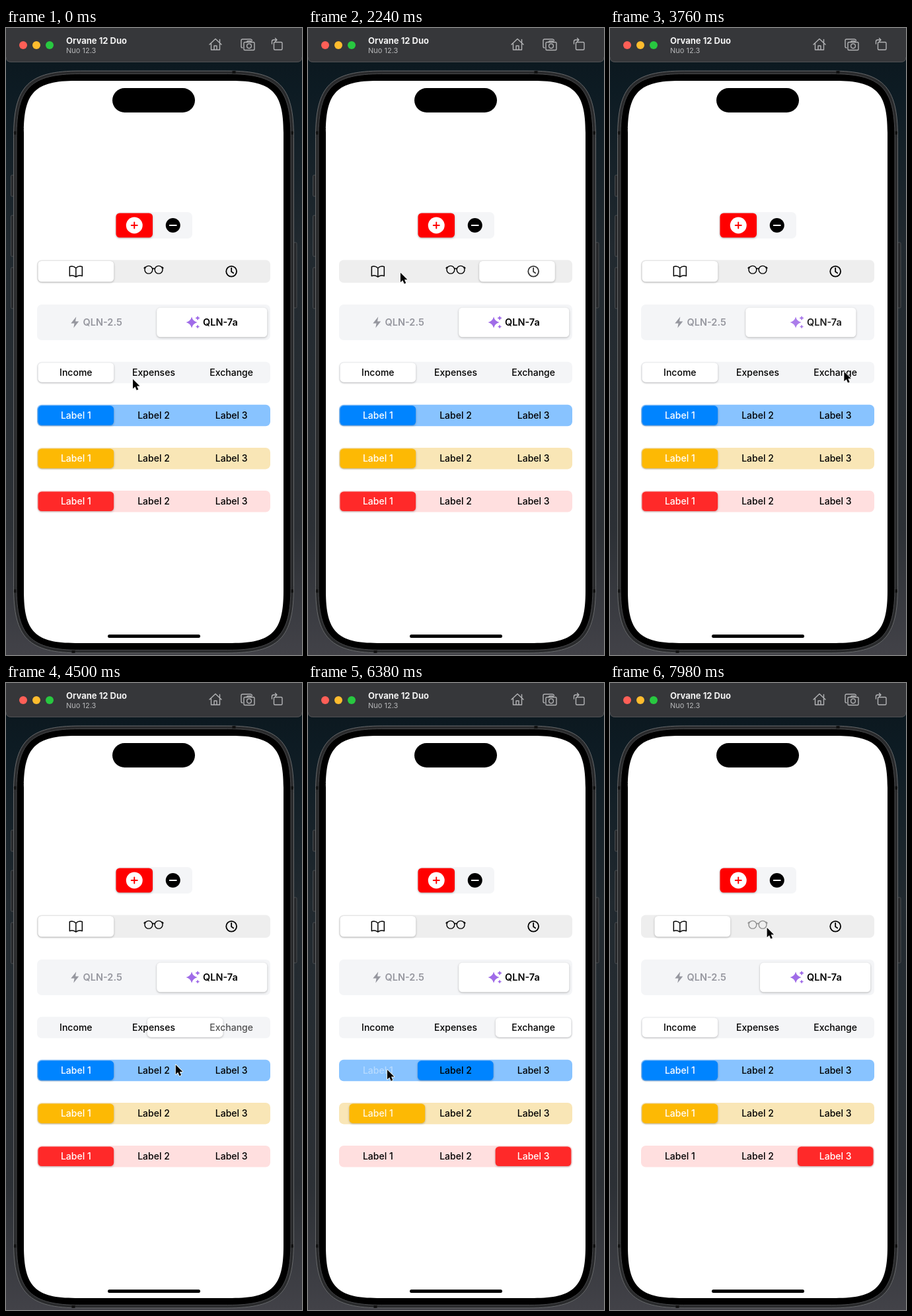
Write an HTML page that moves like this. It is 448x950 px and loops after 8000 ms.

```html
<!DOCTYPE html>
<html lang="en">
<head>
<meta charset="utf-8">
<title>Segmented controls</title>
<style>
html, body { margin: 0; height: 100%; overflow: hidden; background: #10181e; }
svg { display: block; width: 100vw; height: 100vh; }
text { font: 500 14px Inter, "Open Sans", sans-serif; fill: currentColor; }
.line { fill: none; stroke: currentColor; stroke-linecap: round; stroke-linejoin: round; }
.thumb { fill: var(--fill); filter: drop-shadow(0 1px 1.5px #0004); }
.item { color: #000; }
.tint.on, .round.on { color: #fff; }
.sign { stroke: #fff; stroke-width: 2; stroke-linecap: round; }
.round.on .sign { stroke: var(--fill); }
.model { color: #96979f; }
.model text { font-weight: 600; font-size: 14.5px; }
.model.on text { color: #000; }
.bolt.on path { color: #ffb21a; }
.spark.on path { color: #a06ce8; }
</style>
</head>
<body>
<svg viewBox="0 0 448 950" preserveAspectRatio="none">
  <defs>
    <linearGradient id="wall" x2="0" y2="1">
      <stop stop-color="#0b161c"/><stop offset=".1" stop-color="#0d1b23"/>
      <stop offset=".35" stop-color="#21292f"/><stop offset=".8" stop-color="#2c3035"/>
      <stop offset="1" stop-color="#424248"/>
    </linearGradient>
  </defs>
  <rect width="448" height="950" fill="url(#wall)"/>

  <path d="M0 0H448V44Q448 52 440 52H8Q0 52 0 44Z" fill="#36373a"/>
  <path d="M0 44Q0 51.500 8 51.500H440Q448 51.500 448 44" fill="none" stroke="#505154"/>
  <circle cx="26" cy="26" r="6" fill="#ff5f57"/>
  <circle cx="46" cy="26" r="6" fill="#febc2e"/>
  <circle cx="66" cy="26" r="6" fill="#28c840"/>
  <text x="91" y="24" style="font-size:13px;font-weight:700" color="#f2f2f2">Orvane 12 Duo</text>
  <text x="91" y="38" style="font-size:11px;font-weight:400" color="#b5b6b8">Nuo 12.3</text>
  <g class="line" color="#b2b3b5" stroke-width="1.4">
    <path d="M308 25L317 16.500L326 25M310.500 23.500V33H323.500V23.500M323.500 22V17.500M315 33V27H319V33"/>
    <path d="M358 30Q356 30 356 28V19Q356 17 358 17H370Q372 17 372.500 19M364 21.500L365.500 19.700H370.500L372 21.500"/>
    <rect x="360" y="21.500" width="16" height="12" rx="1.500"/>
    <circle cx="368" cy="27.300" r="3.400"/>
    <rect x="405.500" y="21.500" width="12.500" height="11.500" rx="1.500"/>
    <path d="M402.500 24V20.500Q402.500 18 405 18H410M407.500 15.500L410 18L407.500 20.500"/>
  </g>

  <g id="phone"></g>
  <g id="controls"></g>
  <path id="cursor" d="M0 0V14.500L3.400 11.400L5.700 16.800L8.300 15.700L6 10.500H10.500Z"
    stroke="#fff" stroke-width="1.600" stroke-linejoin="round" paint-order="stroke"/>
</svg>
<script>
const LOOP = 8000;
const OMEGA = 2 * Math.PI / 500; // critically damped spring, 500 ms response
const phone = document.getElementById('phone');
const controls = document.getElementById('controls');
const cursor = document.getElementById('cursor');

const rect = (x, y, w, h, r, rest) =>
  `<rect x="${x}" y="${y}" width="${w}" height="${h}" rx="${r}" ${rest}/>`;

// Rectangle with continuous-curvature corners, centred on the phone
function squircle(w, h, r, rest) {
  const e = r * 1.4, k = r * .31, a = w - 2 * e, b = h - 2 * e;
  return `<path transform="translate(${223.5 - w / 2} ${506 - h / 2})" ${rest} d="M0 ${e}` +
    `c0 ${k - e} ${k} ${-e} ${e} ${-e}h${a}c${e - k} 0 ${e} ${k} ${e} ${e}` +
    `v${b}c0 ${e - k} ${-k} ${e} ${-e} ${e}h${-a}c${k - e} 0 ${-e} ${-k} ${-e} ${-e}z"/>`;
}

const button = (x, y, h) => rect(x, y, 6, h, 1.5, 'fill="#25272a" stroke="#55575a" stroke-width=".8"');
phone.innerHTML =
  button(7.5, 223, 32) + button(7.5, 284, 62) + button(7.5, 363, 62) + button(434, 325, 99) +
  squircle(424, 882, 72, 'fill="#292a2c" stroke="#67696b"') +
  '<path d="M345 65V70M102 942V947M12 159H17M430 159H435M12 853H17M430 853H435" stroke="#111" stroke-width="5"/>' +
  squircle(415, 873, 68, 'stroke="#48494b"') +
  squircle(393, 852, 56, 'fill="#fff"') +
  rect(161, 91, 125, 37, 18.5, '') + rect(154, 919, 140, 5, 2.5, '');

// Segment contents are drawn around their own centre.
const item = (kind, body) => ({ kind, body });
const icon = (body, width) => item('', `<g class="line" stroke-width="${width}">${body}</g>`);
const ring = (x, y, r) => `<circle cx="${x}" cy="${y}" r="${r}"/>`;
const labels = (kind, ...names) =>
  names.map(name => item(kind, `<text y="5" text-anchor="middle">${name}</text>`));
const disc = (r, sign) => item('round',
  `<circle r="${r}" fill="currentColor"/><path class="sign" d="${sign}"/>`);
const model = (kind, shape, x, name) => item('model ' + kind,
  `<path fill="currentColor" d="${shape}"/><text x="${x}" y="5">${name}</text>`);
const star = (x, y, r) => {
  const k = r * .2, s = r - k;
  return `M${x} ${y - r}q${k} ${s} ${r} ${r}q${-s} ${k} ${-r} ${r}q${-k} ${-s} ${-r} ${-r}q${s} ${-k} ${r} ${-r}z`;
};

// One control: the bar is split evenly, the thumb is a segment inset by gap.
const control = (x, y, w, h, gap, bg, fills, items, start = 0) =>
  ({ x, y, w, h, gap, bg, fills, items, start, step: w / items.length });
const listRow = (i, bg, fill, items) =>
  control(47, 505.7 + 65.1 * i, 353, 32.5, 1.5, bg, [fill], items);
const numbered = () => labels('tint', 'Label 1', 'Label 2', 'Label 3');

const rows = [
  control(165, 279, 117, 40, 1.5, '#f4f5f7', ['#f00', '#008000'],
    [disc(12.5, 'M-4.500 0H4.500M0-4.500V4.500'), disc(11, 'M-5 0H5')]),
  control(47, 351.5, 353, 34.5, 1.5, '#eee', ['#fff'], [
    icon('<path d="M0-5Q-4.500-9-9.500-7V7Q-4.500 5 0 8.500Q4.500 5 9.500 7V-7Q4.500-9 0-5V8.500"/>', 1.5),
    icon(ring(-7.6, -2.5, 5.9) + ring(7.6, -2.5, 5.9) +
      '<path d="M-14.500-5L-13-6.500M14.500-5L13-6.500M-1.800-3.500Q0-5.500 1.800-3.500"/>', 1.4),
    icon(ring(0, 0, 7.9) + '<path d="M0-5V.500L3 2.500"/>', 1.8)
  ]),
  control(47, 419, 353, 54, 4.7, '#f4f5f7', ['#fff'], [
    model('bolt', 'M-29-8.500L-37 1.500H-31.700L-33 8.500L-25-1.500H-30.200Z', -18.7, 'QLN-2.5'),
    model('spark', star(-30.7, 0, 8.5) + star(-21.7, -6.5, 3.6) + star(-21.7, 6.5, 3), -13.7, 'QLN-7a')
  ], 1),
  listRow(0, '#f4f5f7', '#fff', labels('', 'Income', 'Expenses', 'Exchange')),
  listRow(1, '#88c3ff', '#0084ff', numbered()),
  listRow(2, '#f9e6b6', '#fdb904', numbered()),
  listRow(3, '#ffdfdf', '#ff2929', numbered())
];

// [time, row, segment]
const clicks = [
  [1000, 0, 1], [1400, 0, 0], [1750, 1, 1], [2000, 1, 2], [2660, 1, 0],
  [3116, 2, 0], [3480, 2, 1], [4306, 3, 2], [4800, 4, 1], [5370, 5, 1],
  [5650, 6, 2], [6089, 5, 0], [6376, 4, 0], [6740, 3, 0], [7020, 2, 0],
  [7415, 2, 1], [7924, 1, 1]
];

controls.innerHTML = rows.map(({ x, y, w, h, gap, bg, step, items }) => '<g>' +
  rect(x, y, w, h, 7, `fill="${bg}"`) +
  rect(x + gap, y + gap, step - 2 * gap, h - 2 * gap, 5.5, 'class="thumb"') +
  items.map(({ kind, body }, i) =>
    `<g class="item ${kind}" transform="translate(${x + step * (i + .5)} ${y + h / 2})">${body}</g>`
  ).join('') + '</g>').join('');

rows.forEach((row, i) => {
  row.group = controls.children[i];
  row.thumb = row.group.querySelector('.thumb');
  row.cells = [...row.group.querySelectorAll('.item')];
  row.clicks = clicks.filter(c => c[1] === i);
});

const clamp = u => Math.max(0, Math.min(1, u));
const easeOut = u => 1 - (1 - clamp(u)) ** 3;
const spring = s => s <= 0 ? 0 : 1 - (1 + OMEGA * s) * Math.exp(-OMEGA * s);
// Pressed items dim quickly and fade back after release.
const pressOpacity = s => 1 - .6 * Math.min(clamp((s + 50) / 50), clamp((330 - s) / 250));

// After each click the pointer glides to the next segment, a little right of its centre.
function pointer(t) {
  let x = 192, y = 532, leave = 560;
  for (const [time, r, index] of clicks) {
    if (t < leave) break;
    const row = rows[r], u = easeOut((t - leave) / Math.min(430, time - 40 - leave));
    x += (row.x + row.step * (index + .62) - x) * u;
    y += (row.y + row.h / 2 + 2 - y) * u;
    leave = time;
  }
  return [x, y];
}

function draw(t) {
  for (const row of rows) {
    let selected = row.start, last = selected, position = selected;
    const opacity = row.cells.map(() => 1);
    for (const [time, , index] of row.clicks) {
      position += (index - last) * spring(t - time);
      last = index;
      if (t >= time) selected = index;
      opacity[index] = Math.min(opacity[index], pressOpacity(t - time));
    }
    row.thumb.setAttribute('x', row.x + row.gap + position * row.step);
    row.group.style.setProperty('--fill', row.fills[selected] || row.fills[0]);
    row.cells.forEach((cell, i) => {
      cell.classList.toggle('on', i === selected);
      cell.style.opacity = opacity[i];
    });
  }
  cursor.setAttribute('transform', `translate(${pointer(t)})`);
}

const begin = performance.now();
function tick() {
  draw((performance.now() - begin) % LOOP);
  requestAnimationFrame(tick);
}
tick();
</script>
</body>
</html>
```
